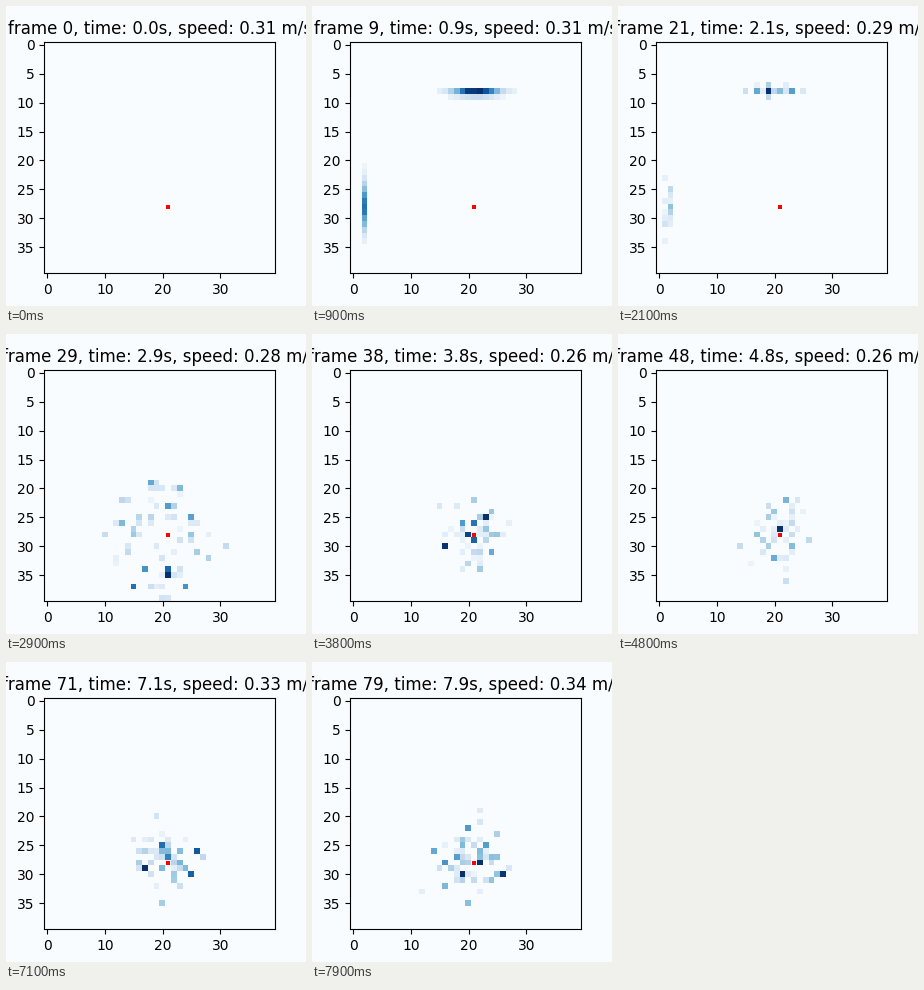
Recreate the animation shown at these times as a matplotlib script. Size 300 by 300 pixels, loop 8000 ms.

```python
import matplotlib.pyplot as plt
import numpy as np
from matplotlib.animation import FuncAnimation

SIZE = 40
FRAMES = 80
TARGET = np.array([21, 28])
BG = "#f8fcff"
SPREAD = 2.85

# hits arrive from above, left, below and right
DIRS = np.array([(0, -1), (-1, 0), (0, 1), (1, 0)])
RANGE_GAIN = np.array([1.032, 1.0, 1.032, 1.0])
SHARE = np.array([0.31, 0.19, 0.31, 0.19])


def speed(f):
    v = np.interp(f, [0, 9, 21, 38, 58, 71, 79],
                  [.31, .31, .29, .26, .25, .33, .34])
    return round(float(v), 2)


def hits(f, rng):
    """Points on four fronts that move out, grow sparse and end as a cloud."""
    count = int(10 ** np.interp(f, [9, 21, 33], [4.8, 2.1, 1.83]))
    radius = np.interp(f, [1, 9, 21, 33], [2, 19, 19.4, 0])
    jitter = np.interp(f, [9, 21, 33], [0.12, 0.5, SPREAD])
    centre = TARGET + (np.interp(f, [9, 21, 33], [0.4, -1, -0.3]),
                       np.interp(f, [9, 33], [0, -0.4]))

    side = rng.choice(4, count, p=SHARE)
    along = DIRS[side]
    across = along[:, ::-1]
    depth = radius * RANGE_GAIN[side] + rng.normal(0, jitter, count)
    offset = rng.normal(0, SPREAD, count)
    # the drift of the centre acts along each front only
    base = TARGET + (centre - TARGET) * np.abs(across)
    return base + along * depth[:, None] + across * offset[:, None]


def field(f):
    img = np.zeros((SIZE, SIZE))
    if f == 0:
        return img
    rng = np.random.default_rng(f)
    x, y = np.rint(hits(f, rng)).astype(int).T
    weight = rng.exponential(1, x.size)
    keep = (x >= 0) & (x < SIZE) & (y >= 0) & (y < SIZE)
    np.add.at(img, (y[keep], x[keep]), weight[keep])
    return img / img.max()


fig, ax = plt.subplots(figsize=(3, 3), dpi=100, facecolor=BG)
ax.set_facecolor(BG)
image = ax.imshow(np.zeros((SIZE, SIZE)), cmap="Blues", vmin=0, vmax=1,
                  interpolation="nearest")
ax.plot(*TARGET, "rs", markersize=2.2, markeredgewidth=0)
title = ax.set_title("")


def update(f):
    image.set_data(np.ma.masked_less(field(f), 0.05))
    title.set_text(f"frame {f}, time: {f / 10:.1f}s, speed: {speed(f)} m/s")
    return image, title


anim = FuncAnimation(fig, update, frames=FRAMES, interval=100,
                     init_func=lambda: update(0), repeat=True, repeat_delay=0)
plt.show()
```
